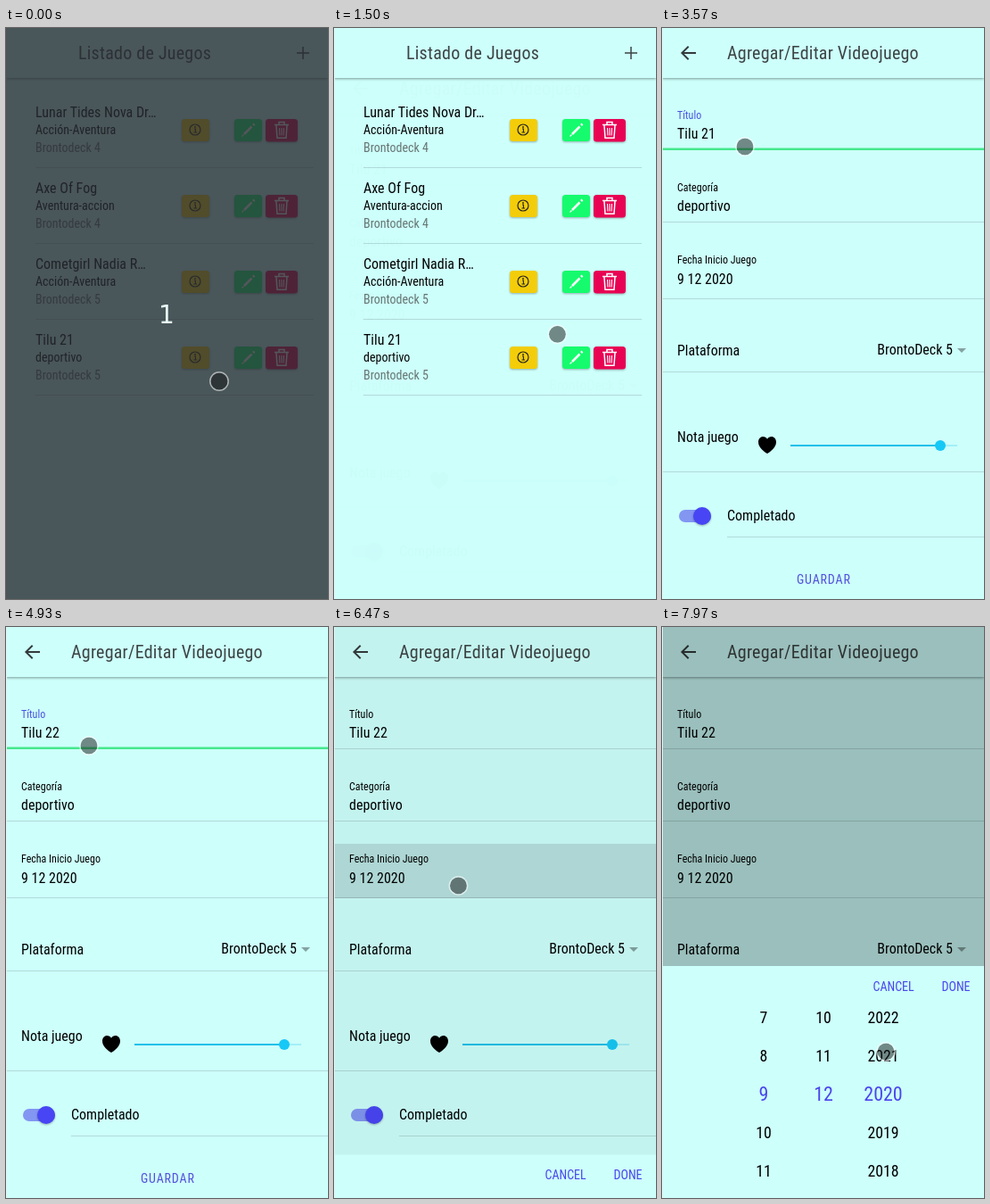
Animation, 361 px wide and 640 px high, one loop 8 s. Source, as an HTML page:

```html
<!DOCTYPE html>
<html lang="es">
<head>
<meta charset="utf-8">
<title>Listado de Juegos</title>
<style>
  html, body { margin: 0; width: 100%; height: 100%; overflow: hidden; background: #cdfffb; }
  svg { display: block; width: 100vw; height: 100vh; }
  text {
    font-family: "Roboto Condensed", Roboto, sans-serif;
    font-stretch: 75%;
    letter-spacing: calc(var(--tight, 0em) + var(--track, 0px));
    white-space: pre;
  }
  .bg { fill: #cdfffb; }
  .head { fill: #cdfffb; filter: drop-shadow(0 1px 1.5px rgba(0, 0, 0, .4)); }
  .bar { font-size: 20px; fill: #3d4444; --track: .25px; }
  .soft { fill: #667471; }
  .accent { fill: #4a45ee; }
  .save { --track: .84px; fill: #5350dc; }
  .rule { stroke: #000; stroke-opacity: .14; }
  .btn { filter: drop-shadow(0 1px 1px rgba(0, 0, 0, .3)); }
  .count { font: 28px "DejaVu Sans", sans-serif; fill: #eafffb; }
  .icon { fill: none; stroke: #fff; }
</style>
</head>
<body>
<svg id="stage" viewBox="0 0 361 640" preserveAspectRatio="none"></svg>
<script>
const LOOP = 8000;
const stage = document.getElementById('stage');
const $ = id => document.getElementById(id);

const text = (x, y, size, str, attrs = '') =>
  `<text x="${x}" y="${y}" font-size="${size}" ${attrs}>${str}</text>`;
const rule = (y, x1 = 1, x2 = 361) =>
  `<path class="rule" d="M${x1} ${y}.5H${x2}"/>`;
const box = (x, y, w, h, attrs) =>
  `<rect x="${x}" y="${y}" width="${w}" height="${h}" ${attrs}/>`;

const games = [
  ['Lunar Tides Nova Dr…', 'Acción-Aventura', 'Brontodeck 4'],
  ['Axe Of Fog', 'Aventura-accion', 'Brontodeck 4'],
  ['Cometgirl Nadia R…', 'Acción-Aventura', 'Brontodeck 5'],
  ['Tilu 21', 'deportivo', 'Brontodeck 5']
];

const buttons = `
  ${box(197, 102, 31, 25, 'rx="3.5" fill="#f4cd08" class="btn"')}
  <circle cx="212" cy="114" r="6" fill="none" stroke="#222" stroke-width="1.2"/>
  <path d="M211 113h1.400v4M210.500 117h3.600" fill="none" stroke="#222" stroke-width="1.1"/>
  <circle cx="212" cy="111" r=".9" fill="#222"/>
  ${box(256, 102, 31, 25, 'rx="3.5" fill="#13fb6c" class="btn"')}
  <path class="icon" d="M267 119l8.500-8.500M277 109l1.500-1.500" stroke-width="2.6"/>
  <path class="icon" d="M264.500 121.500l2-2" stroke-width="1.2"/>
  ${box(291, 102, 36, 25.5, 'rx="3.5" fill="#e90152" class="btn"')}
  <path class="icon" stroke-width="1.5"
    d="M301 108.500h16M306 108v-2.500h6v2.500M303 109l1 14.300h10l1-14.300"/>
  <path class="icon" stroke-width="1.1" d="M306.500 112l.4 8.500M309 112v8.500M311.500 112l-.4 8.500"/>`;

const gameRow = ([title, genre, platform], i) => `
  <g transform="translate(0 ${i * 85})">
    ${text(33, 100, 16, title)}
    ${text(33, 119, 14, genre)}
    ${text(33, 139, 14, platform, 'class="soft"')}
    ${buttons}
    ${rule(156, 33, 345)}
  </g>`;

const header = (x, title, icon) =>
  box(0, 0, 361, 56, 'class="head"') + text(x, 35, 20, title, 'class="bar"') + icon;

const listPage = `
  ${box(0, 0, 361, 640, 'class="bg"')}
  ${header(81, 'Listado de Juegos',
    '<path d="M326 28h14M333 21v14" stroke="#3d4444" stroke-width="1.5"/>')}
  ${games.map(gameRow).join('')}`;

const formPage = `
  ${box(0, 0, 361, 680, 'class="bg"')}
  ${header(73, 'Agregar/Editar Videojuego',
    '<path transform="translate(17 16)" fill="#333b3b" d="M21 11H7.800l5.600-5.600L12 4l-8 8 8 8 1.400-1.400L7.800 13H21z"/>')}
  ${text(17, 102, 12, 'Título', 'id="label"')}
  ${text(17, 124, 16, '', 'id="field"')}
  <rect id="caret" y="109" width="1" height="19"/>
  ${rule(136)}
  ${box(1, 134.5, 360, 2.5, 'id="focus" fill="#45e88c"')}
  ${text(17, 183, 12, 'Categoría')}
  ${text(17, 205, 16, 'deportivo')}
  ${rule(217)}
  ${box(1, 243, 360, 61, 'id="pressed"')}
  ${text(17, 264, 12, 'Fecha Inicio Juego')}
  ${text(17, 287, 16, '9 12 2020')}
  ${rule(303)}
  ${text(17, 367, 16, 'Plataforma')}
  ${text(326, 366, 16, 'BrontoDeck 5', 'text-anchor="end"')}
  <path d="M331 359h10l-5 5z" fill-opacity=".36"/>
  ${rule(385)}
  ${text(17, 464, 16, 'Nota juego')}
  <path d="M118 477c-3-1.800-10-6.300-10-13 0-3.400 2.400-6 5.300-6 2 0 3.700 1 4.700 2.700 1-1.700 2.700-2.700 4.700-2.700 2.900 0 5.300 2.600 5.300 6 0 6.700-7 11.200-10 13z"/>
  <path d="M144 468H331" stroke="#a3eff8" stroke-width="2"/>
  <path d="M144 468H312" stroke="#1cc0e8" stroke-width="2"/>
  <circle cx="312" cy="468" r="6" fill="#16c8f6"/>
  ${rule(497)}
  ${box(19, 540, 36, 14, 'rx="7" fill="#8296f2"')}
  <circle cx="45" cy="547" r="10" fill="#4845f5" class="btn"/>
  ${text(73, 552, 16, 'Completado')}
  ${rule(570, 73)}
  ${text(151, 623, 14, 'GUARDAR', 'class="save"')}`;

const wheel = (x, values, selected) => values.map((v, i) => {
  const on = v === selected;
  return text(x, 443.5 + 43 * i + (on ? 1.5 : 0), on ? 22 : 17.8, v,
    'text-anchor="middle"' + (on ? ' class="accent"' : ''));
}).join('');

const picker = `
  ${box(0, 380, 361, 261, 'class="bg"')}
  ${text(236.5, 407.5, 14, 'CANCEL', 'class="accent"')}
  ${text(313.5, 407.5, 14, 'DONE', 'class="accent"')}
  ${wheel(114, [7, 8, 9, 10, 11], 9)}
  ${wheel(181, [10, 11, 12], 12)}
  ${wheel(248, [2022, 2021, 2020, 2019, 2018], 2020)}`;

stage.innerHTML = `
  ${listPage}
  <g id="form">${formPage}</g>
  ${box(0, 0, 361, 640, 'id="backdrop"')}
  <g id="picker">${picker}</g>
  ${box(0, 0, 1, 640, 'fill="#e4f3f1"')}
  <g id="intro">
    ${box(0, 0, 361, 640, 'fill="#282c33" fill-opacity=".8"')}
    <text class="count" x="180" y="331" text-anchor="middle">1</text>
  </g>
  <g id="pointer">
    <circle r="9.500" fill="#141414" fill-opacity=".5"/>
    <circle r="10.200" fill="none" stroke="#fff" stroke-opacity=".55" stroke-width="1.5"/>
  </g>`;

// Tighten the tracking when no condensed face is available.
const probe = $('label');
const narrow = probe.getComputedTextLength();
probe.style.cssText = 'font-family: Roboto, sans-serif; font-stretch: 100%';
if (narrow > probe.getComputedTextLength() * .97) stage.style.setProperty('--tight', '-.06em');
probe.style.cssText = '';

// Pointer path: time, x, y
const path = [
  [30, 239, 396], [600, 267, 372], [1430, 267, 372], [2030, 127, 130],
  [2129, 127, 130], [2130, 121, 119], [2229, 121, 119], [2230, 116, 139],
  [2400, 116, 139], [2750, 88, 181], [3200, 30, 115], [3430, 93, 133],
  [5270, 93, 133], [5630, 95, 209], [5929, 95, 209], [5930, 111, 226],
  [6030, 111, 226], [6130, 141, 279], [6370, 141, 279], [6500, 139, 293],
  [6800, 139, 293], [7170, 172, 521], [7270, 172, 521], [7800, 258, 475],
  [7969, 258, 475], [7970, 251, 476]
];
const caretOn = [[2570, 3570], [4070, 4930], [5430, 5930]];

const ramp = (t, from, to) => Math.min(1, Math.max(0, (t - from) / (to - from)));
const within = (t, from, to) => t >= from && t < to;

// cubic-bezier(.36, .66, .04, 1)
function ease(p) {
  if (p <= 0 || p >= 1) return p;
  const curve = (s, a, b) => 3 * (1 - s) ** 2 * s * a + 3 * (1 - s) * s * s * b + s ** 3;
  let lo = 0, hi = 1;
  for (let i = 0; i < 24; i++) {
    const mid = (lo + hi) / 2;
    if (curve(mid, .36, .04) < p) lo = mid; else hi = mid;
  }
  return curve(lo, .66, 1);
}

function pointerAt(t) {
  const i = path.findIndex(k => k[0] > t);
  if (i === 0) return path[0].slice(1);
  if (i < 0) return path[path.length - 1].slice(1);
  const [t0, x0, y0] = path[i - 1], [t1, x1, y1] = path[i];
  const p = ramp(t, t0, t1);
  return [x0 + (x1 - x0) * p, y0 + (y1 - y0) * p];
}

const put = (id, name, value) => $(id).setAttribute(name, value);

function draw(t) {
  put('intro', 'opacity', 1 - ramp(t, 30, 330));

  const enter = ease(ramp(t, 1500, 1780));
  put('form', 'opacity', enter);
  put('form', 'transform', `translate(0 ${40 * (1 - enter)})`);

  const focused = within(t, 2500, 6420);
  put('label', 'fill', focused ? '#4a52e2' : '#000');
  put('focus', 'opacity', focused ? ramp(t, 2500, 2700) : 0);

  const value = t < 4330 ? 'Tilu 21' : t < 4430 ? 'Tilu 2' : 'Tilu 22';
  if ($('field').textContent !== value) $('field').textContent = value;
  put('caret', 'x', Math.round(17 + $('field').getComputedTextLength()));
  put('caret', 'opacity', caretOn.some(([a, b]) => within(t, a, b)) ? 1 : 0);

  put('pressed', 'opacity', .13 * ramp(t, 6370, 6480) * (1 - ramp(t, 6850, 7050)));

  const open = ease(ramp(t, 6435, 6835));
  put('backdrop', 'opacity', .25 * open);
  put('picker', 'transform', `translate(0 ${261 * (1 - open)})`);

  put('pointer', 'transform', `translate(${pointerAt(t)})`);
}

const start = performance.now();
function tick() {
  draw((performance.now() - start) % LOOP);
  requestAnimationFrame(tick);
}
tick();
</script>
</body>
</html>
```
